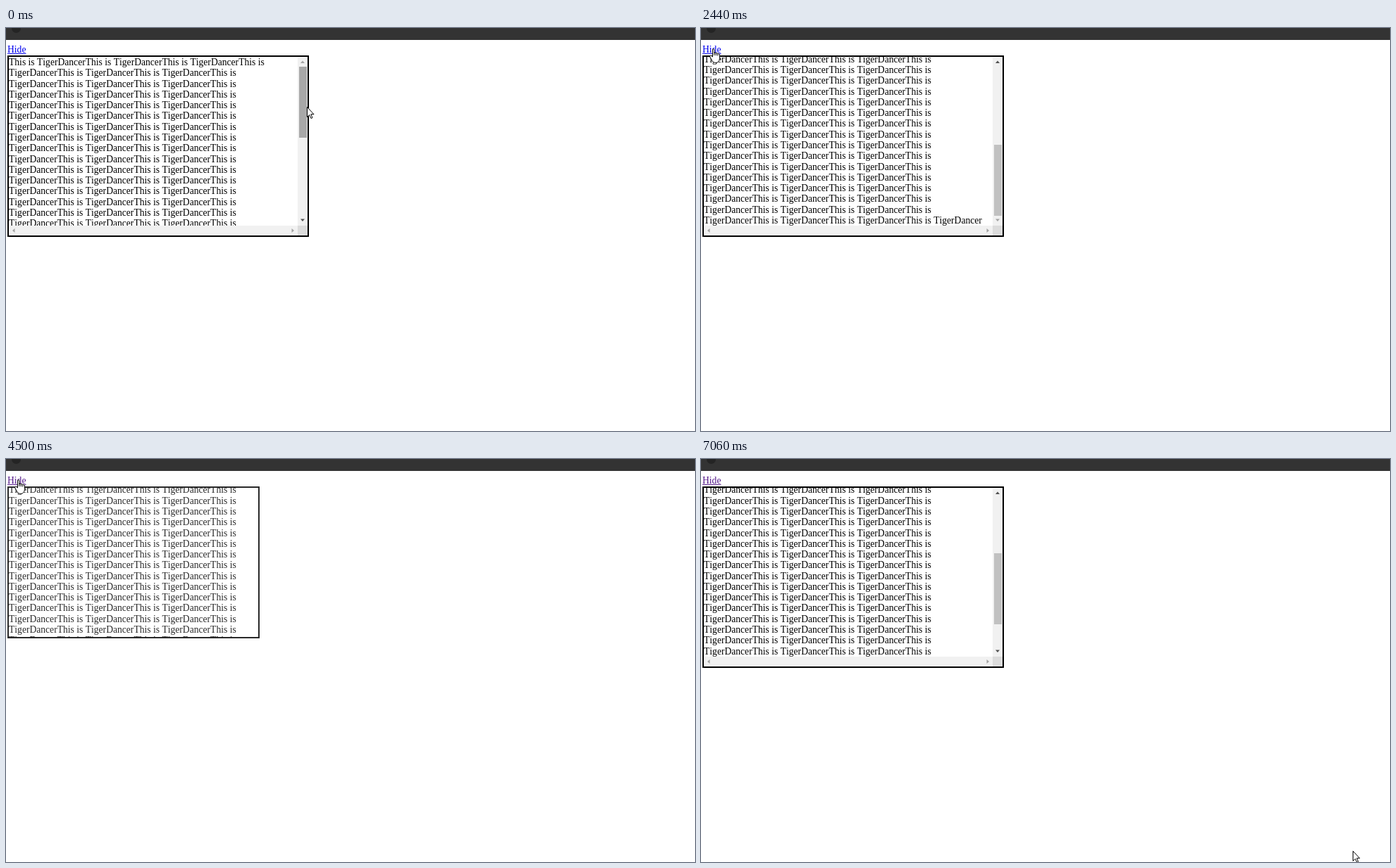
Recreate the animation shown at these times as an HTML page. Size 978 px wide and 573 px high, loop 7130 ms.

```html
<!DOCTYPE html>
<html lang="en">
<head>
<meta charset="utf-8">
<title>Toggle box</title>
<style>
  html, body { margin: 0; width: 100%; height: 100%; overflow: hidden; background: #fff; }
  body { position: relative; font: 13.6px/15.28px "Liberation Serif", "Times New Roman", serif; font-kerning: none; }
  #bar { position: absolute; left: 0; top: 0; width: 100%; height: 16.5px; background: #333; overflow: hidden; }
  #bar i { position: absolute; left: 8px; top: -6px; width: 13px; height: 13px; border-radius: 50%; background: #242424; }
  #link { position: absolute; left: 2px; top: 23px; text-decoration: underline; }
  #box { position: absolute; left: 2px; top: 39px; border: 2px solid #000; overflow: hidden; color: #000; }
  #text { position: absolute; left: 0; }
  #scrollbars, #cursors { position: absolute; left: 0; top: 0; }
  #cursors { width: 100%; height: 100%; }
  #cursors g { fill: #fff; stroke: #000; stroke-width: 1; stroke-linejoin: round; }
</style>
</head>
<body>
<div id="bar"><i></i></div>
<span id="link">Hide</span>
<div id="box">
  <div id="text"></div>
  <svg id="scrollbars" width="424" height="254">
    <path fill="#f1f1f1" d="M410 0h14v240h-14zM0 240h410v14H0z"/>
    <path fill="#dcdcdc" d="M410 240h14v14h-14z"/>
    <rect id="thumb" x="412" y="14" width="11" height="101"/>
    <path id="up" d="M414 9h6l-3-3.5z"/>
    <path id="down" d="M414 230.500h6l-3 3.500z"/>
    <path fill="#a3a3a3" d="M8.500 244v6l-3.500-3zM401.500 244v6l3.500-3z"/>
  </svg>
</div>
<svg id="cursors">
  <g id="arrow"><path d="M.5 .5V14.500L3.700 11.500 6 16.500 8 15.600 5.800 10.700H10z"/></g>
  <g id="beam"><path fill="none" d="M-2.500 .5H-.5L.5 1.500 1.500 .5H3.500M.5 1.500V13.500M-2.500 14.500H-.5L.5 13.500 1.500 14.500H3.500"/></g>
  <g id="hand">
    <path d="M4.500 12V2C4.500 .2 6.900 .2 6.900 2V7C7 5.700 9.300 5.800 9.300 7.200 9.500 6.200 11.800 6.300 11.800 7.900 12 7 14.400 7.200 14.400 8.900V13.500C14.400 17.500 12.500 20.400 8.800 20.400 5 20.400 4 18 2.700 15.500L.7 12C0 10.500 2.300 9.200 4.500 12z"/>
    <path fill="none" d="M6.900 6.500V10M9.300 7V10.200M11.800 7.800V10.500"/>
  </g>
</svg>
<script>
const LOOP = 7130, FULL_W = 424, FULL_H = 254, SCROLLBAR = 14;
const MAX_SCROLL = 264, CLAMPED_SCROLL = 188, THUMB_RANGE = 111, GRAB_Y = 112;
const FADE = 600;

// Each row: time, shape, x, y; an empty shape hides the pointer.
const pointer = [
  [0, 'arrow', 427, 112], [330, 'arrow', 428, 124], [400, 'arrow', 430, 148],
  [480, 'arrow', 432, 178], [550, 'arrow', 434, 208], [620, 'arrow', 437, 236],
  [700, 'arrow', 439, 262], [770, 'arrow', 440, 280],
  [990, 'beam', 149, 101], [1090, 'beam', 104, 62], [1170, 'arrow', 67, 23], [1240, '', 0, 0],
  [1470, 'arrow', 41, 6], [1550, 'arrow', 34, 11], [1650, 'arrow', 26, 16],
  [1730, 'arrow', 21, 19], [1810, 'arrow', 18, 21], [1960, 'arrow', 17, 21],
  [2210, 'hand', 12, 25], [2290, 'hand', 12, 27], [2440, 'hand', 12, 29],
  [4730, 'beam', 300, 105], [4800, 'arrow', 639, 228], [4890, 'arrow', 656, 239],
  [5520, 'arrow', 731, 259], [5590, 'arrow', 739, 262], [5740, 'arrow', 739, 261],
  [6360, 'arrow', 792, 320], [6440, '', 0, 0],
  [6830, 'arrow', 923, 549], [6910, 'arrow', 925, 552], [6980, 'arrow', 926, 555], [7060, 'arrow', 925, 557]
];
const links = [
  [0, 'Hide', '#0000ee'], [2660, 'Hide', '#ff0000'], [2810, 'Show', '#551a8b'],
  [3910, 'Show', '#ff0000'], [4090, 'Hide', '#551a8b']
];
const fadeTicks = [2810, 2890, 2980, 3060, 3130, 3210, 3290, 3360,
  4090, 4170, 4250, 4330, 4410, 4500, 4570, 4650, 4730].map(t => [t]);

const $ = id => document.getElementById(id);
const [link, box, text, bars, thumb, up, down] =
  ['link', 'box', 'text', 'scrollbars', 'thumb', 'up', 'down'].map($);
const shapes = ['arrow', 'beam', 'hand'];
text.textContent = 'This is TigerDancer'.repeat(100);

const latest = (rows, t) => rows.findLast(row => row[0] <= t);
const swing = p => 0.5 - Math.cos(Math.PI * Math.min(1, Math.max(0, p))) / 2;

// Share of the box that is open, from 0 to 1.
function openness(t) {
  if (t < 2810 || t >= 4730) return 1;
  if (t >= 3360 && t < 4090) return 0;
  const [tick] = latest(fadeTicks, t);
  return t < 3360 ? 1 - swing((tick - 2823) / FADE) : swing((tick - 4060) / FADE);
}

function drawPointer(t) {
  const [, shape, x, y] = latest(pointer, t);
  for (const id of shapes) $(id).style.display = id === shape ? '' : 'none';
  if (shape) $(shape).setAttribute('transform', `translate(${x} ${y})`);
  return y;
}

function drawBox(t, pointerY) {
  const open = openness(t), scrollable = t < 2810 || t >= 4730;
  const drag = t < 990 ? Math.min(THUMB_RANGE, pointerY - GRAB_Y) : THUMB_RANGE;
  const scroll = t < 2810 ? Math.round(drag / THUMB_RANGE * MAX_SCROLL) : CLAMPED_SCROLL;
  box.style.display = open ? '' : 'none';
  box.style.opacity = open;
  box.style.width = FULL_W * open + 'px';
  box.style.height = FULL_H * open + 'px';
  text.style.width = (scrollable ? FULL_W - SCROLLBAR : FULL_W * open) + 'px';
  text.style.top = -scroll + 'px';

  bars.style.display = scrollable ? '' : 'none';
  thumb.setAttribute('y', SCROLLBAR + Math.floor(scroll / MAX_SCROLL * THUMB_RANGE));
  thumb.setAttribute('fill', t < 330 ? '#a8a8a8' : t < 990 ? '#787878' : '#c1c1c1');
  up.setAttribute('fill', scroll > 0 ? '#505050' : '#a3a3a3');
  down.setAttribute('fill', scroll < MAX_SCROLL ? '#505050' : '#a3a3a3');
}

function draw(t) {
  const [, label, color] = latest(links, t);
  link.textContent = label;
  link.style.color = color;
  drawBox(t, drawPointer(t));
}

const start = performance.now();
function frame() {
  draw((performance.now() - start) % LOOP);
  requestAnimationFrame(frame);
}
frame();
</script>
</body>
</html>
```
